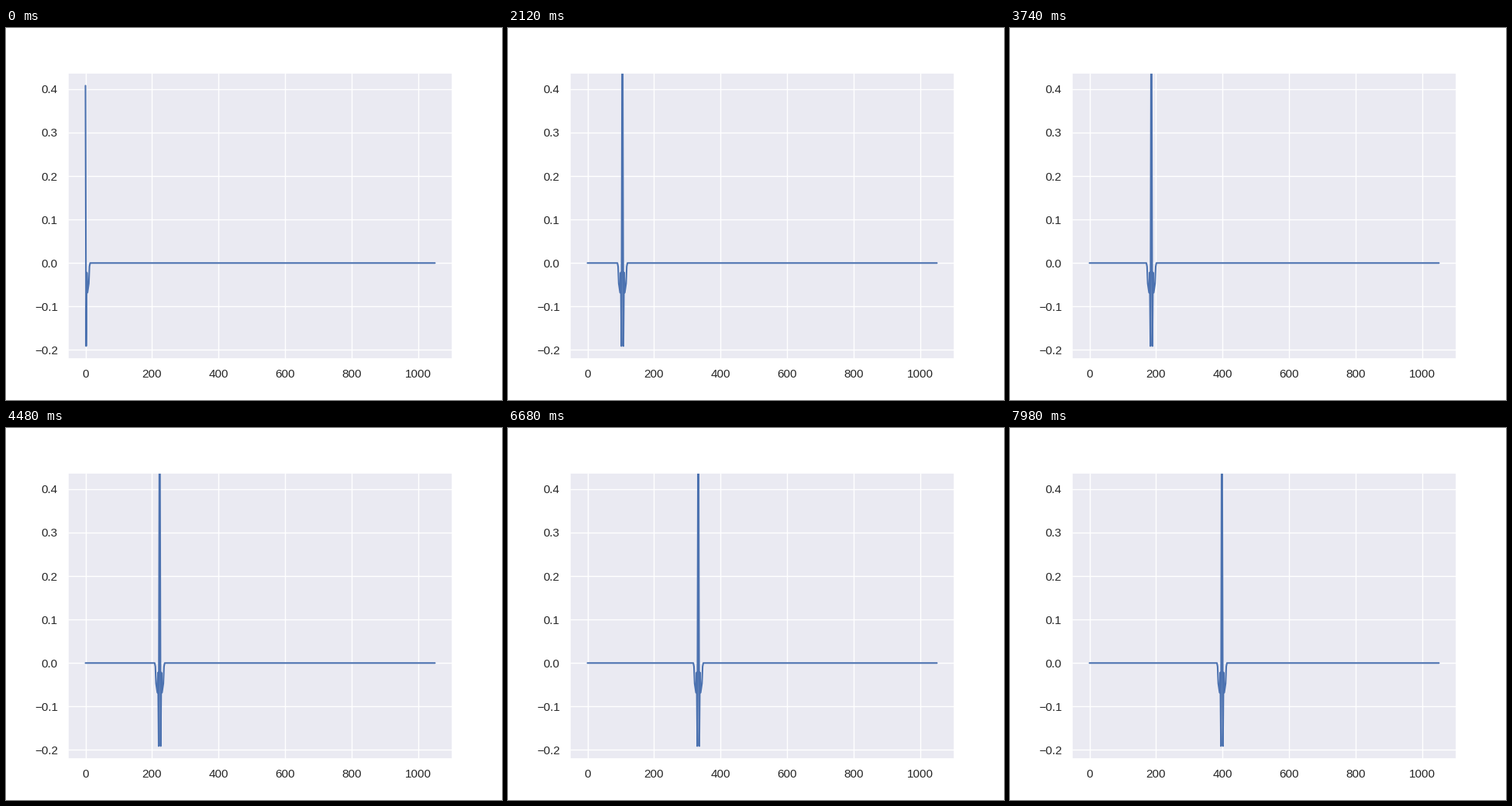
These frames come from a looping animation (640x480 px, 8000 ms). A matplotlib script:

```python
import numpy as np
import matplotlib.pyplot as plt
from matplotlib.animation import FuncAnimation

SAMPLES = 1051
FRAMES = 400
STEP_MS = 20
INK = "#262626"

plt.rcParams.update({
    "font.family": "Liberation Sans",
    "axes.facecolor": "#EAEAF2",
    "axes.edgecolor": "white",
    "axes.linewidth": 1.25,
    "axes.grid": True,
    "axes.axisbelow": True,
    "grid.color": "white",
    "grid.linewidth": 1,
    "lines.solid_capstyle": "round",
})

x = np.arange(SAMPLES)


def response(dist):
    """Narrow peak, deep trough, then a small ripple that fades to zero."""
    knots = [0, 1, 3, 5, 7, 11, 13, 15]
    levels = [0.9, 0.408, -0.191, -0.022, -0.068, -0.047, -0.008, 0]
    return np.interp(dist, knots, levels)


def signal(n):
    return response(np.abs(x - (n - 1)))


fig, ax = plt.subplots(figsize=(6.4, 4.8), dpi=100, facecolor="white")
ax.tick_params(labelsize=11, length=6, labelcolor=INK, left=False, bottom=False)
line, = ax.plot(x, signal(0), color="#4C72B0", linewidth=1.5)
ax.set_xlim(ax.get_xlim())
ax.set_ylim(ax.get_ylim())


def update(n):
    line.set_ydata(signal(n))
    return line,


anim = FuncAnimation(fig, update, frames=FRAMES, interval=STEP_MS,
                     init_func=lambda: update(0), repeat=True, repeat_delay=0)
plt.show()
```
